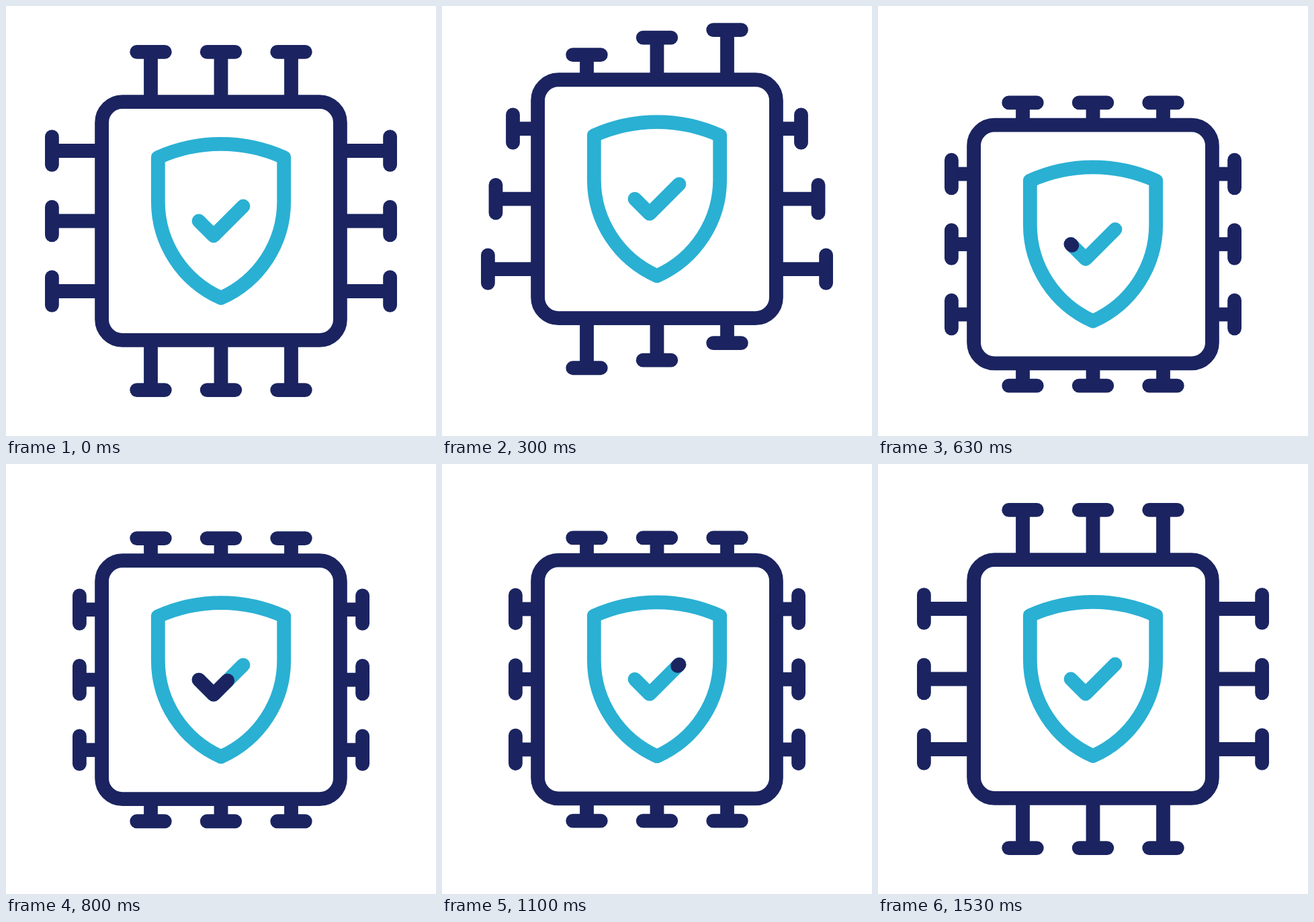
Animation of 640 by 640 pixels, one loop 1.67 s. Source, as an HTML page with a canvas:

```html
<!DOCTYPE html>
<html lang="en">
<head>
<meta charset="utf-8">
<title>Secure chip</title>
<style>
  html, body { margin: 0; width: 100%; height: 100%; overflow: hidden; background: #fff; }
  canvas { display: block; width: 100vw; height: 100vh; }
</style>
</head>
<body>
<canvas id="stage" width="640" height="640"></canvas>
<script>
const ctx = document.getElementById('stage').getContext('2d');
const NAVY = '#1b2460', CYAN = '#2ab0d3';
const LOOP = 1670, FPS = 30, STROKE = 20.8, CENTER = 320;
const PIN_GAP = 104.5, PIN_TRAVEL = 41;

const clamp = v => Math.min(1, Math.max(0, v));

// Cubic timing curve with flat ends; a and b are the handle lengths in time.
function easing(a, b) {
  return x => {
    if (x <= 0) return 0;
    if (x >= 1) return 1;
    let lo = 0, hi = 1;
    for (let i = 0; i < 24; i++) {
      const t = (lo + hi) / 2, r = 1 - t;
      if (3 * a * r * r * t + 3 * b * r * t * t + t ** 3 < x) lo = t; else hi = t;
    }
    return lo * lo * (3 - 2 * lo);
  };
}
const hop = easing(0.34, 0.48);
const slide = easing(0.25, 0.75);
const smooth = easing(1 / 3, 2 / 3);

const span = (tick, start, length, ease) => ease(clamp((tick - start) / length));

// [tick, vertical offset]
const BOUNCE = [[0, 0], [12, -36], [20, 36], [28, -20.7], [36, 6], [45, 0]];

function bounceAt(tick) {
  for (let i = 1; i < BOUNCE.length; i++) {
    const [t0, y0] = BOUNCE[i - 1], [t1, y1] = BOUNCE[i];
    if (tick < t1) return y0 + (y1 - y0) * hop((tick - t0) / (t1 - t0));
  }
  return 0;
}

const retraction = (tick, order) => PIN_TRAVEL *
  (span(tick, 4 + 3 * order, 6, slide) - span(tick, 36 + 2 * order, 6, slide));

function line(points, color, cap = 'round') {
  ctx.strokeStyle = color;
  ctx.lineCap = cap;
  ctx.beginPath();
  points.forEach(([x, y]) => ctx.lineTo(x, y));
  ctx.stroke();
}

// One side of the chip; dir tells which end of the row moves first.
function drawPins(tick, angle, dir) {
  ctx.save();
  ctx.translate(CENTER, CENTER);
  ctx.rotate(angle);
  for (let order = 0; order < 3; order++) {
    const x = (order - 1) * PIN_GAP * dir;
    const y = -251.6 + retraction(tick, order);
    line([[x, y], [x, -184]], NAVY, 'butt');
    line([[x - 20.8, y], [x + 20.8, y]], NAVY);
  }
  ctx.restore();
}

function drawChip() {
  ctx.strokeStyle = NAVY;
  ctx.beginPath();
  ctx.roundRect(142.6, 142.6, 354.8, 354.8, 30.8);
  ctx.stroke();
}

function drawShield() {
  const radius = 228.5, half = Math.asin(93.7 / radius);
  ctx.strokeStyle = CYAN;
  ctx.beginPath();
  ctx.arc(CENTER, 205.4 + radius, radius, -Math.PI / 2 - half, -Math.PI / 2 + half);
  ctx.lineTo(413.7, 291);
  ctx.bezierCurveTo(413.7, 353, 377, 409, 320, 434.5);
  ctx.bezierCurveTo(263, 409, 226.3, 353, 226.3, 291);
  ctx.closePath();
  ctx.stroke();
}

const CHECK = [[287, 320], [309, 342], [353, 298]];
const BEND = 1 / 3;

function checkPoint(p) {
  const [from, to, u] = p < BEND
    ? [CHECK[0], CHECK[1], p / BEND]
    : [CHECK[1], CHECK[2], (p - BEND) / (1 - BEND)];
  return from.map((v, i) => v + (to[i] - v) * u);
}

function drawCheck(tick) {
  line(CHECK, CYAN);
  const head = span(tick, 18, 10, smooth);
  const tail = span(tick, 25, 9, smooth);
  if (head <= tail) return;
  const points = [checkPoint(tail)];
  if (tail < BEND && head > BEND) points.push(CHECK[1]);
  points.push(checkPoint(head));
  line(points, NAVY);
}

function draw(time) {
  const tick = Math.floor((time % LOOP + 3.5) * FPS / 1000) % 50;
  ctx.fillStyle = '#fff';
  ctx.fillRect(0, 0, 640, 640);
  ctx.lineWidth = STROKE;
  ctx.lineJoin = 'round';
  ctx.save();
  ctx.translate(0, bounceAt(tick));
  drawPins(tick, 0, 1);
  drawPins(tick, Math.PI / 2, 1);
  drawPins(tick, Math.PI, 1);
  drawPins(tick, -Math.PI / 2, -1);
  drawChip();
  drawShield();
  drawCheck(tick);
  ctx.restore();
}

let start;
function loop(now) {
  start ??= now;
  draw(Math.max(0, now - start));
  requestAnimationFrame(loop);
}
draw(0);
requestAnimationFrame(loop);
</script>
</body>
</html>
```
